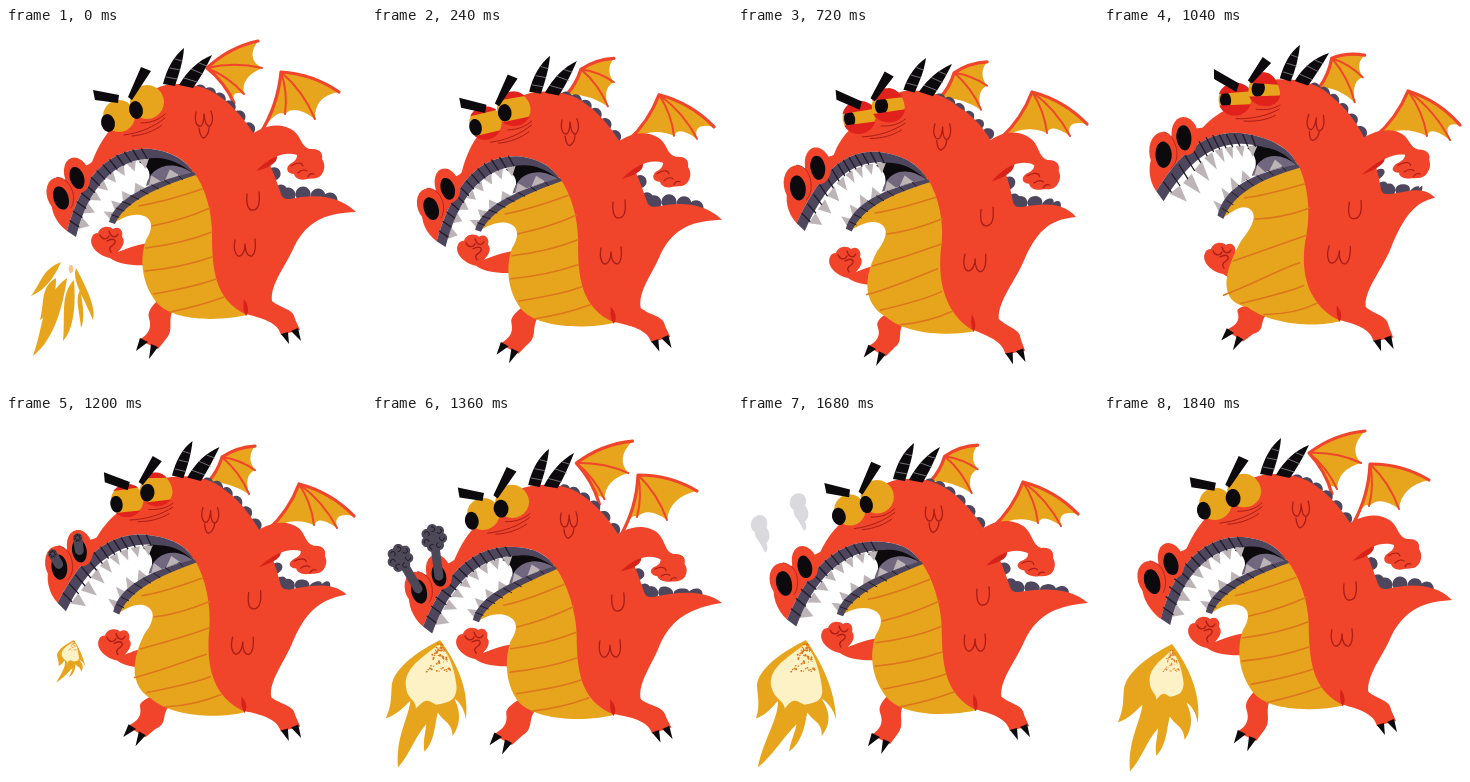
Write an HTML page that moves like this. It is 360 px wide and 360 px high and loops after 1920 ms.

```html
<!DOCTYPE html>
<html lang="en">
<head>
<meta charset="utf-8">
<title>Dragon</title>
<style>
  html, body { margin: 0; width: 100%; height: 100%; overflow: hidden; background: #fff; }
  svg { display: block; width: 100%; height: 100%; }
</style>
</head>
<body>
<svg id="stage" viewBox="0 0 360 360"></svg>
<script>
const LOOP = 1920, STEP = 80;
const RED = '#f0452b', DEEP = '#a91d16', GOLD = '#e7a51e', RUST = '#dc761b',
      PLUM = '#4d465c', INK = '#0c0a0d', CREAM = '#fdf2c5', TOOTH = '#bcb4b6';

const mix = (a, b, k) => a + (b - a) * k;
const clamp = v => Math.max(0, Math.min(1, v));

// Handles of the resting drawing; a pose moves them and the drawing follows.
const rest = {
  jaw: [65, 207], noseL: [55, 169], noseR: [71, 149], eyeL: [114, 88], eyeR: [139, 73],
  horn: [163, 57], horn1: [178, 20], horn2: [206, 27], back: [197, 95], corner: [185, 145],
  chin: [105, 193], throat: [146, 198], belly: [137, 235], side: [206, 235],
  bottom: [190, 290], footL: [142, 315], footR: [283, 300], tail: [350, 183],
  notch: [283, 170], shoulder: [255, 110], fistR: [303, 134], mid: [247, 172], low: [239, 220]
};
// "hand" carries the left fist, which moves whole behind the belly.
const lean = {
  t: 720, lid: 1, all: [6, 8], jaw: [-3, -7], noseL: [5, -10], noseR: [9, -11], eyeL: [7, 2],
  eyeR: [12, 2], horn: [8, 6], horn1: [10, 10], horn2: [8, 9], back: [6, 13], corner: [2, 7],
  chin: [5, 7], throat: [3, 8], hand: [6, 20], belly: [-10, 23], side: [-7, 12],
  bottom: [0, 15], footL: [-4, 7], footR: [-7, 20], tail: [-12, 5], notch: [0, 8],
  shoulder: [7, 5], fistR: [5, 11], mid: [2, 16], low: [-2, 15]
};
const inhale = {
  t: 1040, lid: 1, all: [13, 4], jaw: [-10, -38], noseL: [5, -44], noseR: [9, -41],
  eyeL: [17, -16], eyeR: [23, -15], horn: [18, -5], horn1: [18, -3], horn2: [19, -2],
  corner: [6, -8], chin: [11, -6], throat: [5, -7], hand: [15, 16], belly: [-19, 23],
  side: [-11, 6], bottom: [0, 7], footL: [-12, -9], footR: [-5, 7], tail: [-19, -14],
  notch: [2, -5], shoulder: [13, 5], fistR: [10, 0], mid: [4, 9], low: [-4, 7]
};
const poses = [
  { t: 0, lid: 0, all: [0, 0] },
  { t: 400, lid: 1, all: [0, 13], jaw: [6, 17], noseL: [7, 18], noseR: [8, 18], eyeL: [0, 12],
    eyeR: [3, 10], corner: [0, 10], footL: [-9, 7], footR: [7, 12], horn2: [-2, 10] },
  lean, inhale,
  { t: 1360, lid: 0, all: [-1, 13], jaw: [-10, 8], noseL: [-8, 5], noseR: [-4, 10],
    eyeL: [-2, 10], eyeR: [0, 11], corner: [-5, 6], chin: [-2, 10], footL: [-12, 7],
    footR: [5, 10], tail: [0, 3], notch: [-3, 10], fistR: [-3, 17], horn2: [-4, 10] },
  { t: 1680, lid: 0, all: [-2, 7], jaw: [-12, 1], noseL: [-9, -3], noseR: [-4, 1], eyeL: [-1, 6],
    corner: [-5, 1], chin: [-4, 4], footL: [0, 7], footR: [-3, 8], tail: [0, 3],
    notch: [-3, 5], fistR: [-1, 11], horn2: [-4, 4] },
  { t: 1840, lid: 0, all: [-1, 2], jaw: [-4, 0], noseL: [-7, -5], noseR: [-4, -2], eyeL: [-2, 0],
    eyeR: [0, 0], corner: [-5, 0], footL: [0, 4], footR: [-2, 3], tail: [-2, 0] },
  { t: LOOP, lid: 0, all: [0, 0] }
];

function span(keys, t) {
  const i = Math.max(1, keys.findIndex(k => k.t > t)), a = keys[i - 1], b = keys[i];
  return [a, b, (t - a.t) / (b.t - a.t)];
}
function offset(name, t) {
  const [a, b, k] = span(poses, t), u = a[name] || a.all, v = b[name] || b.all;
  return [mix(u[0], v[0], k), mix(u[1], v[1], k)];
}

// Moving least squares: each point follows the nearby handles with a turn and a scale.
function makeWarp(t) {
  const handles = Object.entries(rest).map(([name, [x, y]]) => {
    const [dx, dy] = offset(name, t);
    return [x, y, x + dx, y + dy];
  });
  return (x, y) => {
    let sum = 0, c = [0, 0, 0, 0], dot = 0, cross = 0, size = 0;
    const w = handles.map(h => 1 / (((h[0] - x) ** 2 + (h[1] - y) ** 2) ** 1.5 + 1));
    handles.forEach((h, i) => { sum += w[i]; c = c.map((v, j) => v + w[i] * h[j]); });
    c = c.map(v => v / sum);
    handles.forEach((h, i) => {
      const [px, py, qx, qy] = h.map((v, j) => v - c[j]);
      dot += w[i] * (px * qx + py * qy);
      cross += w[i] * (px * qy - py * qx);
      size += w[i] * (px * px + py * py);
    });
    const dx = x - c[0], dy = y - c[1];
    return [c[2] + (dot * dx - cross * dy) / size, c[3] + (cross * dx + dot * dy) / size];
  };
}

const pt = p => p.map(v => v.toFixed(1)).join(' ');
const bend = (d, fn) => d.replace(/(-?\d+\.?\d*) (-?\d+\.?\d*)/g, (_, x, y) => pt(fn(+x, +y)));
const fill = (d, c) => `<path d="${d}" fill="${c}"/>`;
const line = (d, c, w) =>
  `<path d="${d}" fill="none" stroke="${c}" stroke-width="${w}" stroke-linecap="round" stroke-linejoin="round"/>`;

function ring(cx, cy, rx, ry = rx, turn = 0, from = 0, to = 360) {
  const r = turn * Math.PI / 180, out = [];
  for (let i = 0; i <= 24; i++) {
    const a = mix(from, to, i / 24) * Math.PI / 180, x = rx * Math.cos(a), y = ry * Math.sin(a);
    out.push(pt([cx + x * Math.cos(r) - y * Math.sin(r), cy + x * Math.sin(r) + y * Math.cos(r)]));
  }
  return 'M' + out.join(' L') + ' Z';
}

function along(c, u) {
  const v = 1 - u, f = [v * v * v, 3 * v * v * u, 3 * v * u * u, u * u * u];
  return [0, 1].map(j => f.reduce((s, k, i) => s + k * c[i][j], 0));
}

const lipOut = [[61, 203], [74, 155], [100, 118], [145, 121]];
const lipIn = [[70, 209], [82, 160], [108, 130], [150, 130]];
const lowIn = [[103, 194], [108, 172], [140, 155], [188, 144]];
const lowOut = [[109, 196], [118, 175], [148, 160], [190, 147]];
const backLine = [[194, 63], [222, 67], [256, 110], [275, 163]];

function teeth(curve, n, from, to, h) {
  let d = '';
  for (let i = 0; i < n; i++) {
    const u = mix(from, to, i / (n - 1)), g = (to - from) / (n - 1) * .38;
    const a = along(curve, u - g), b = along(curve, u + g);
    const len = Math.hypot(b[0] - a[0], b[1] - a[1]);
    const tip = [(a[0] + b[0]) / 2 - (b[1] - a[1]) / len * h, (a[1] + b[1]) / 2 + (b[0] - a[0]) / len * h];
    d += `M${pt(a)} L${pt(tip)} L${pt(b)} Z `;
  }
  return d;
}
function bars(a, b, n) {
  let d = '';
  for (let i = 1; i < n; i++) d += `M${pt(along(a, i / n))} L${pt(along(b, i / n))} `;
  return d;
}

const scales = [...Array(10).keys()].map(i => ring(...along(backLine, i / 9), 6.5)).join(' ') +
  [[282, 167], [297, 166], [312, 168], [324, 172]].map(p => ring(...p, 7.5)).join(' ');

const bodyBack = [
  fill(scales, PLUM),
  fill('M61 203 C50 195 44 182 46 172 C60 140 80 140 86 134 C92 118 100 106 106 100 C115 80 140 62 160 57 C180 54 200 58 213 68 C240 86 262 125 275 166 C277 171 280 171 284 171 C306 166 332 166 350 184 C322 185 302 191 288 219 C280 238 264 256 266 273 C276 281 288 281 289 291 L294 302 L275 307 C272 294 255 290 240 286 L166 284 C162 295 168 302 160 311 L152 321 L133 312 C143 306 146 300 143 290 C141 284 146 278 152 272 L165 200 L187 145 C182 135 170 124 145 121 C100 118 74 155 61 203 Z', RED),
  fill('M134 310 L142 314 L130 323 Z M145 316 L152 319 L143 331 Z M275 306 L282 304 L283 316 Z M285 303 L292 300 L295 313 Z', INK)
].join('');

const leftArm = [
  fill('M92 205 C94 198 103 197 107 201 C113 197 118 203 116 209 C121 214 114 222 112 224 C118 222 128 217 142 215 L144 237 C125 238 112 236 104 230 C92 228 82 217 86 209 C87 206 89 205 92 205 Z', RED),
  line('M94 207 C96 212 101 212 103 208 M103 203 C105 210 110 210 112 206 M101 213 C108 209 112 213 107 217 C103 219 103 222 105 224', DEEP, 1.3)
].join('');

const bodyFront = [
  fill('M108 195 C118 172 150 156 187 143 C200 160 206 185 206 205 C206 240 208 272 241 287 C215 293 170 294 152 276 C138 260 132 235 140 212 C146 203 148 192 138 188 C128 184 115 190 108 195 Z', GOLD),
  line('M133 178 C155 174 176 168 196 161 M146 198 C166 194 186 188 204 180 M140 220 C164 217 186 212 206 204 M139 243 C162 241 186 236 206 229 M148 266 C170 262 192 258 210 251 M164 284 C184 280 202 275 218 269', RUST, 1.6),
  fill('M133 134 C145 124 170 126 187 145 C165 146 150 152 141 157 C146 147 144 139 133 134 Z', INK),
  fill('M140 158 C144 138 166 130 188 146 C170 148 152 154 140 158 Z', '#71677f'),
  fill(teeth(lipIn, 8, .1, .9, 10), TOOTH),
  fill(teeth(lowIn, 6, .1, .84, -9), TOOTH),
  fill('M61 203 C74 155 100 118 145 121 C170 124 182 135 189 147 C178 138 166 130 150 130 C108 130 82 160 70 209 Z', PLUM),
  line(bars(lipOut, lipIn, 14), '#201b27', 1.3),
  fill('M103 194 C108 172 140 155 188 144 L190 147 C148 160 118 175 109 196 Z', PLUM),
  line(bars(lowIn, lowOut, 9), '#201b27', 1),
  fill(ring(71, 147, 12.5, 18, -18), RED),
  fill(ring(54, 167, 13, 18, -18), RED),
  line(ring(54, 167, 13, 18, -18, -80, 60).replace(' Z', ''), DEEP, .8),
  fill(ring(71, 150, 7, 11.5, -18) + ring(55, 170, 7.5, 12, -18), INK),
  fill('M157 56 C161 40 168 28 178 20 C177 34 173 46 169 58 Z M173 57 C182 42 192 33 206 27 C200 40 193 52 187 60 Z', INK),
  line('M160 49 L171 51 M164 40 L174 42 M169 31 L176 33 M178 50 L191 54 M185 41 L197 46 M193 35 L201 38', '#8d8890', .8),
  line('M118 107 C134 105 148 99 159 90 M126 108 C138 107 148 103 156 97 M135 95 C146 95 154 91 159 86', DEEP, 1),
  line('M190 84 C188 94 191 99 195 98 C198 95 198 91 198 86 C199 96 201 99 204 98 C207 95 207 89 205 83 M193 100 C194 107 196 110 198 110 C201 108 203 104 203 99 M241 166 C240 178 243 183 247 182 C253 182 254 174 253 164 M229 212 C227 222 230 229 234 228 C238 226 239 221 239 216 C239 224 242 229 246 228 C250 225 250 219 249 211', DEEP, 1.3),
  fill('M238 271 C243 278 243 284 240 288 C237 283 237 277 238 271 Z', '#d7221a'),
  fill('M250 143 C255 136 264 132 270 125 C274 133 266 139 250 143 Z', '#d7221a'),
  fill('M237 114 C255 95 276 94 288 103 C296 110 295 119 304 121 C315 120 317 126 316 131 C320 137 318 143 316 146 C312 152 305 150 301 151 C294 153 289 150 288 146 C281 146 279 140 284 136 C289 133 291 131 291 127 C280 123 264 128 250 143 Z', RED),
  line('M285 138 C291 134 296 134 297 138 M292 145 C295 142 298 141 301 143 M302 149 C303 146 305 145 308 146', DEEP, 1.1)
].join('');

const brows = lid => fill(`M87 62 L${113 + 2 * lid} ${67 + 5 * lid} L${112 + 2 * lid} ${75 + 5 * lid} L89 72 Z ` +
  'M135 39 L145 43 L126 72 L122 69 Z', INK);

function eye(cx, cy, r, px, py, lid) {
  const s = Math.asin(1 - .64 * lid) * 180 / Math.PI;
  const pupil = ring(mix(px, cx - 8.5, lid), mix(py, cy + 2, lid), 6.8 - lid, 9 - lid, -12);
  const lids = lid > 0 ? fill(ring(cx, cy, r + .5, r + .5, -12, 180 + s, 360 - s) +
    ring(cx, cy, r + .5, r + .5, -12, s, 180 - s), '#e0211c') : '';
  return fill(ring(cx, cy, r), GOLD) + fill(pupil, INK) + lids;
}

// Wing points: root, elbow, tip and two membrane corners, keyed over six steps.
const wingA = [
  { t: 0, p: [228, 75, 201, 40, 252, 13, 256, 40, 238, 66] },
  { t: 1, p: [199, 58, 212, 28, 245, 25, 243, 47, 235, 72] },
  { t: 3, p: [194, 60, 209, 34, 242, 23, 242, 47, 236, 71] },
  { t: 5, p: [229, 76, 206, 35, 262, 13, 258, 45, 234, 71] }
];
const wingB = [
  { t: 0, p: [254, 106, 275, 44, 333, 64, 309, 91, 279, 86] },
  { t: 1, p: [258, 104, 291, 58, 343, 92, 333, 107, 310, 103] },
  { t: 3, p: [256, 105, 287, 59, 342, 91, 325, 103, 302, 100] },
  { t: 5, p: [250, 106, 267, 46, 326, 62, 296, 91, 266, 88] }
];
function wing(keys, t, [dx, dy]) {
  const [a, b, k] = span([...keys, { t: 6, p: keys[0].p }], t / STEP % 6);
  const n = a.p.map((v, i) => mix(v, b.p[i], k) + (i % 2 ? dy : dx));
  const [root, elbow, tip, c1, c2] = [0, 2, 4, 6, 8].map(i => [n[i], n[i + 1]]);
  const sag = (u, v) => pt([0, 1].map(j => mix((u[j] + v[j]) / 2, elbow[j], .28)));
  const side = (u, v, h) => pt([(u[0] + v[0]) / 2 + (v[1] - u[1]) * h, (u[1] + v[1]) / 2 - (v[0] - u[0]) * h]);
  const arm = `M${pt(root)} Q${side(root, elbow, -.12)} ${pt(elbow)} Q${side(elbow, tip, .14)} ${pt(tip)}`;
  const ray = c => `M${pt(elbow)} Q${side(elbow, c, .12)} ${pt(c)} `;
  return fill(`${arm} Q${sag(tip, c1)} ${pt(c1)} Q${sag(c1, c2)} ${pt(c2)} Q${sag(c2, root)} ${pt(root)} Z`, GOLD) +
    line(ray(c1) + ray(c2), RED, 2) + line(arm, RED, 3.2);
}

const flameOuter = 'M68 222 C45 234 22 250 20 268 C20 280 22 288 16 302 C28 298 34 290 40 284 C38 304 24 320 22 352 C36 338 42 322 56 308 C54 318 50 326 50 336 C62 326 64 310 68 296 C74 306 82 306 81 320 C92 306 90 294 84 282 C90 286 94 292 96 303 C98 272 84 245 68 222 Z';
const flameCore = 'M67 226 C50 240 32 250 34 268 C36 283 46 283 46 292 C56 280 58 284 66 288 C78 286 86 284 85 270 C82 250 76 235 67 226 Z';

function sparks() {
  let seed = 7, d = '';
  const rnd = () => (seed = seed * 16807 % 2147483647) / 2147483647;
  for (let i = 0; i < 70; i++) {
    const y = 226 + rnd() ** 1.4 * 30;
    d += ring(67 + (rnd() - .5) * (y - 218) * .75, y, .5 + rnd() * .6);
  }
  return d;
}
const sparkle = sparks();

function leaf(x1, y1, x2, y2, w) {
  const at = (k, s) => pt([mix(x1, x2, k) + s * w, mix(y1, y2, k) + s * w * .3]);
  return `M${x1} ${y1} C${at(.3, -1.4)} ${at(.6, -.2)} ${x2} ${y2} C${at(.75, 1.1)} ${at(.35, .7)} ${x1} ${y1} Z `;
}

function fire(t) {
  if (t < 240) {
    const k = t / 240, w = 1 - k, d =
      leaf(55, 234, 25, 268, 7 * w) + leaf(50, 250, 34, 292, 8 * w) + leaf(61, 250, 27, 328, 11 * w) +
      leaf(68, 252, 57, 313, 8 * w) + leaf(70, 240, 87, 292, 7 * w) + leaf(74, 262, 75, 300, 4 * w);
    const fall = (x, y) => [x, mix(y, 300, k * .3)];
    return fill(bend(d, fall), GOLD) + fill(ring(65, 241, 2.4 * w, 4 * w), '#f3c789');
  }
  if (t < 1200) return '';
  const grow = clamp((t - 1120) / 240), fade = clamp((t - 1680) / 240);
  const sway = (x, y) => {
    const far = (y - 222) / 100;
    return [68 + (x - 68) * grow + 3 * far * Math.sin(y / 18 - t / 76),
            224 + (y - 222) * grow * .98 + 6 * fade];
  };
  const shrink = (x, y) => sway(mix(x, 68, fade * .5), mix(y, 236, fade * .35));
  return fill(bend(flameOuter, sway), GOLD) + fill(bend(flameCore, shrink), CREAM) +
    fill(bend(sparkle, shrink), RUST);
}

function smoke(t, warp) {
  if (t < 1200 || t > 1720) return '';
  const k = clamp((t - 1120) / 240), late = clamp((t - 1360) / 320);
  const tone = `rgb(${[[77, 218], [72, 218], [88, 222]].map(([a, b]) => Math.round(mix(a, b, late)))})`;
  const puff = (nx, ny, dx, dy, dx2, dy2) => {
    const [x, y] = warp(nx, ny);
    const cx = x + mix(dx * k, dx2, late), cy = y + mix(dy * k, dy2, late);
    if (late > .5) {
      return [ring(cx, cy - 9, 8, 9, 30), ring(cx + 3, cy + 1, 7, 10, -20), leaf(cx + 1, cy, cx + 6, cy + 20, 6)]
        .map(d => fill(d, tone)).join('');
    }
    let d = ring(cx, cy, 8 * k), curl = '';
    for (let i = 0; i < 7; i++) {
      const a = i * Math.PI * 2 / 7, px = cx + 8 * k * Math.cos(a), py = cy + 9 * k * Math.sin(a);
      d += ring(px, py, 5.2 * k);
      curl += ring(px, py, 2.4 * k, 2.4 * k, 0, i * 51, i * 51 + 200).replace(' Z', ' ');
    }
    return line(`M${pt([x, y])} L${pt([cx, cy])}`, tone, 9 * (1 - late)) + fill(d, tone) + line(curl, INK, .8);
  };
  return puff(54, 168, -18, -31, -24, -48) + puff(71, 150, -5, -38, -7, -56);
}

function frame(t) {
  const warp = makeWarp(t);
  const [a, b, k] = span(poses, t), lid = mix(a.lid, b.lid, k);
  const shift = (x, y) => { const p = warp(x, y); return [p[0] - x, p[1] - y]; };
  const shaped = s => s.replace(/ d="([^"]*)"/g, (_, d) => ` d="${bend(d, warp)}"`);
  const eyes = eye(113, 88, 16, 102, 95, lid) + eye(141, 74, 17, 130, 82, lid);
  return wing(wingA, t, shift(215, 70)) + wing(wingB, t, shift(255, 110)) + shaped(bodyBack) +
    `<g transform="translate(${pt(offset('hand', t))})">${leftArm}</g>` +
    shaped(bodyFront + eyes + brows(lid)) + smoke(t, warp) + fire(t);
}

const stage = document.getElementById('stage');
let shown = -1;
function tick() {
  const t = Math.floor(performance.now() % LOOP / STEP) * STEP;
  if (t !== shown) stage.innerHTML = frame(shown = t);
  requestAnimationFrame(tick);
}
tick();
</script>
</body>
</html>
```
